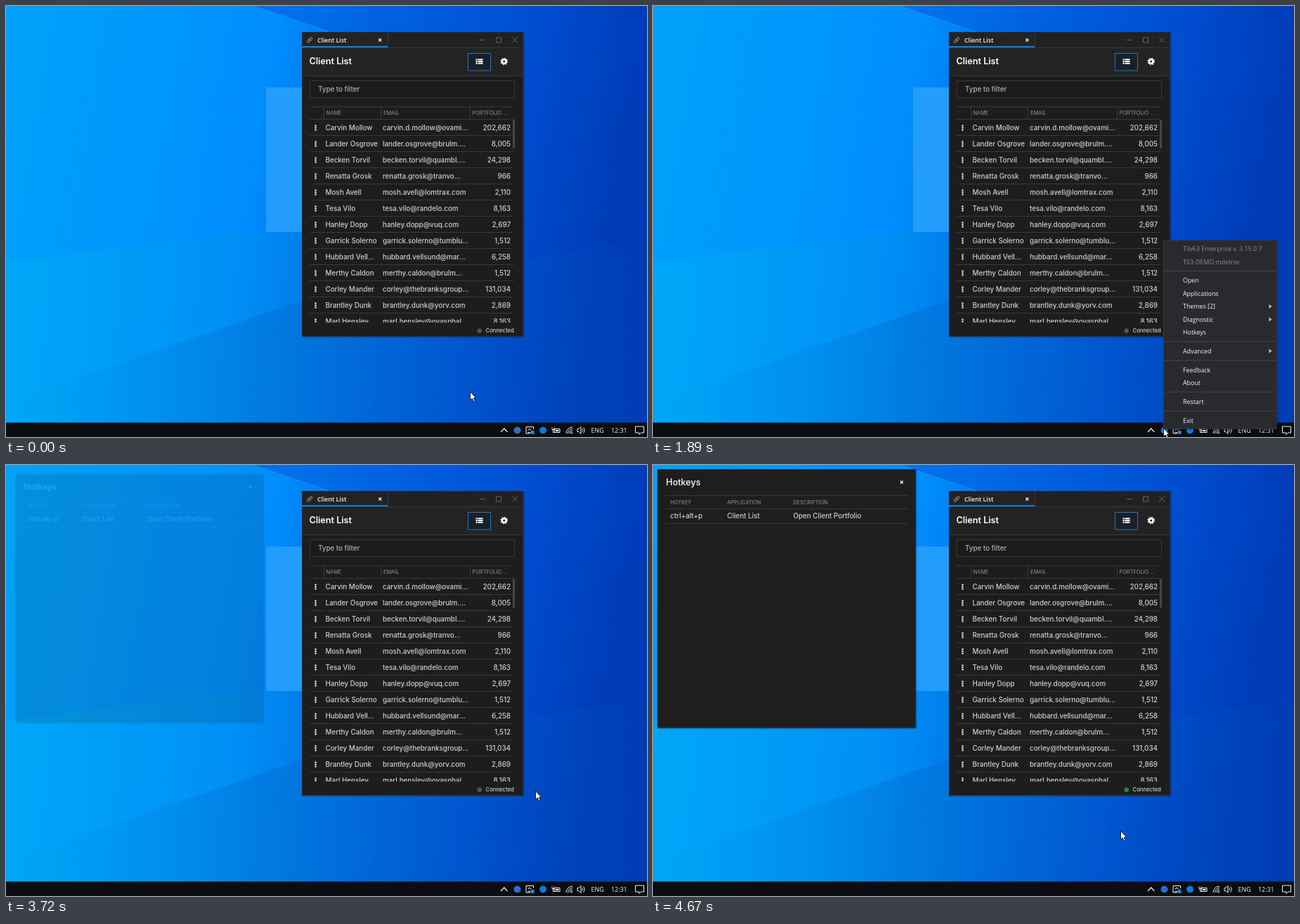
Recreate the animation shown at these times as an HTML page. Size 912 px wide and 614 px high, loop 6.44 s.

```html
<!DOCTYPE html>
<html lang="en">
<head>
<meta charset="utf-8">
<title>Client List hotkeys</title>
<style>
html, body { margin: 0; width: 100%; height: 100%; overflow: hidden; background: #0078e0; }
svg { display: block; width: 912px; height: 614px; }
text { font-family: Inter, "Open Sans", sans-serif; font-size: 9.8px; font-weight: 500; fill: #d0d0d0; white-space: pre; }
.title { font-size: 12.6px; font-weight: 600; fill: #fff; }
.head { font-size: 7.4px; font-weight: 400; fill: #969696; }
.small { font-size: 7.7px; }
.ui { font-family: "Open Sans", "Noto Sans", sans-serif; font-size: 8.9px; font-weight: 400; fill: #f4f4f4; }
.bold { font-size: 8.7px; font-weight: 600; }
.dim { fill: #8d8e90; }
.end { text-anchor: end; }
.line { stroke: #393939; fill: none; }
.icon { stroke: #f2f2f2; fill: none; }
.shadow { filter: drop-shadow(1.5px 1.5px 1px rgba(0, 0, 0, .35)); }

#cursor, #menu, #hover, #hotkeys, #status { animation: 6440ms linear infinite; }
#cursor { animation-name: cursor; animation-timing-function: ease-in-out; }
#menu { animation-name: menu; }
#hover { animation-name: hover; animation-timing-function: step-end; }
#hotkeys { animation-name: fade, grow; transform-origin: 190px 190px; }
#status { animation-name: status; }

@keyframes cursor {
  0%, 1.4% { transform: translate(660px, 549px); }
  4.19%, 6.37% { transform: translate(670px, 554px); }
  16.61% { transform: translate(720px, 590px); }
  18.48% { transform: translate(722px, 596px); }
  23.45%, 29.97% { transform: translate(726px, 601px); }
  35.25% { transform: translate(737px, 530px); }
  45.19%, 57.76% { transform: translate(753px, 464px); animation-timing-function: ease-in; }
  59.63% { transform: translate(750px, 473px); }
  65.84%, 72.36% { transform: translate(666px, 520px); }
  72.52%, 100% { transform: translate(665px, 521px); }
}
@keyframes menu {
  0%, 25.47% { opacity: 0; }
  27.95%, 55.12% { opacity: 1; }
  55.121%, 100% { opacity: 0; }
}
@keyframes hover {
  0% { transform: translateY(-900px); }
  30.9% { transform: translateY(581.5px); }
  32.3% { transform: translateY(554.5px); }
  33.76% { transform: translateY(528px); }
  36.7% { transform: translateY(509.5px); }
  39.2% { transform: translateY(-900px); }
  40.1% { transform: translateY(482.5px); }
  41.8% { transform: translateY(-900px); }
  42.9%, 100% { transform: translateY(455.5px); }
}
@keyframes fade {
  0%, 57.45% { opacity: 0; }
  59.94%, 100% { opacity: 1; }
}
@keyframes grow {
  0%, 57.45% { transform: scale(.955); animation-timing-function: cubic-bezier(.5, 1, .89, 1); }
  61.65%, 100% { transform: scale(1); }
}
@keyframes status {
  0%, 58.2% { fill: #545454; }
  62%, 100% { fill: #3c7a43; }
}
</style>
</head>
<body>
<svg viewBox="0 0 912 614">
  <defs>
    <linearGradient id="sky" x2="1" y2=".12">
      <stop offset="0" stop-color="#00a2f8"/>
      <stop offset=".22" stop-color="#0098fc"/>
      <stop offset=".42" stop-color="#008efd"/>
      <stop offset=".58" stop-color="#006be8"/>
      <stop offset=".8" stop-color="#004fd4"/>
      <stop offset="1" stop-color="#003ab4"/>
    </linearGradient>
    <linearGradient id="low" x2="1">
      <stop offset="0" stop-color="#00b0f6" stop-opacity=".5"/>
      <stop offset=".55" stop-color="#008cec" stop-opacity=".5"/>
      <stop offset="1" stop-color="#0058cc" stop-opacity="0"/>
    </linearGradient>
    <linearGradient id="floor" x2="1">
      <stop offset="0" stop-color="#0098e4" stop-opacity="0"/>
      <stop offset=".4" stop-color="#0074d6" stop-opacity=".6"/>
      <stop offset="1" stop-color="#0048b8" stop-opacity=".2"/>
    </linearGradient>
    <linearGradient id="dusk">
      <stop offset="0" stop-color="#0068e4" stop-opacity=".75"/>
      <stop offset="1" stop-color="#0040c4" stop-opacity=".15"/>
    </linearGradient>
    <clipPath id="table"><path d="M422 143h312v308H422z"/></clipPath>
  </defs>

  <g id="desktop">
    <path d="M0 0h912v614H0z" fill="url(#sky)"/>
    <path d="M352 0H912V130H735z" fill="url(#dusk)"/>
    <path d="M352 0L735 130" stroke="#2ca6ff" stroke-opacity=".45"/>
    <path d="M0 365L370 318 640 330 700 594H0z" fill="url(#low)"/>
    <path d="M0 565L420 420 912 330V594H0z" fill="url(#floor)"/>
    <path d="M370 116h206v206H370z" fill="#229cfd"/>
  </g>

  <g id="taskbar">
    <path d="M0 593.5h912V614H0z" fill="#0c0d11"/>
    <path class="icon" d="M704 607l4.7-5 4.7 5" stroke-width="1.2"/>
    <circle cx="727.5" cy="604.5" r="5" fill="#2c6fc9"/>
    <path class="icon" d="M750.5 603v-3.5h-10.5v9.5h6M743 604.5a2 2 0 1 1 4 0M742.5 607.5h4"/>
    <path d="M747 605h4.5v5H747z" fill="#2f83d8"/>
    <circle cx="764" cy="604.5" r="5" fill="#0a7bdc"/>
    <path class="icon" d="M780.5 602.5h7.5v5h-7.5zM777 600.5v3h3v-3M778.5 603.5v4h2"/>
    <path d="M782 604h4.5v2H782z" fill="#f2f2f2"/>
    <path class="icon" d="M797 609a9 9 0 0 1 9-9M799.5 609a6.5 6.5 0 0 1 6.5-6.5M802 609a4 4 0 0 1 4-4"/>
    <circle cx="805" cy="608.3" r="1.1" fill="#f2f2f2"/>
    <path class="icon" d="M813 602.5h2l3-3v10l-3-3h-2zM820 602.5q1.5 2 0 4M821.5 600.5q3.5 4 0 8"/>
    <text class="ui" x="832.5" y="607.8">ENG</text>
    <text class="ui" x="861" y="607.8">12:31</text>
    <path class="icon" d="M895.5 599h12v9h-4l-2.5 2.5V608h-5.5z"/>
  </g>

  <g id="client">
    <path class="shadow" d="M421 37h315v434H421z" fill="#1d1d1d"/>
    <path d="M421 37h315v62.5H421z" fill="#232324"/>
    <path d="M543.5 38h192v21.5h-192z" fill="#202122"/>
    <path d="M421.5 37.5h314v433h-314z" fill="none" stroke="#2a2b2d"/>
    <path class="line" d="M543.5 38v21.5H735M422 99.5h313"/>
    <path d="M421 57.3h122v2H421z" fill="#1688e6"/>
    <g transform="translate(432 48.5) rotate(-45)" fill="none" stroke="#8a8a8a">
      <rect x="-4.5" y="-1.5" width="5" height="3" rx="1.5"/>
      <rect x="-.5" y="-1.5" width="5" height="3" rx="1.5"/>
    </g>
    <text class="ui bold" x="443" y="52">Client List</text>
    <path class="icon" d="M530.3 46.5l4 4m0-4l-4 4" stroke-width="1.2"/>
    <path d="M674 48.5h8M697.5 45h7v7h-7zM720 44.5l8 8m0-8l-8 8" fill="none" stroke="#656565"/>
    <text class="title" x="431.5" y="83">Client List</text>
    <path d="M657.5 67.5h32v24.500h-32z" fill="#182029" stroke="#2878b8"/>
    <path d="M668.5 75.2h2.2v2h-2.2zm3 0h7v2h-7zm-3 2.8h2.2v2h-2.2zm3 0h7v2h-7zm-3 2.8h2.2v2h-2.2zm3 0h7v2h-7z" fill="#fff"/>
    <circle cx="708.7" cy="79" r="2.8" fill="none" stroke="#fff" stroke-width="2.4"/>
    <circle cx="708.7" cy="79" r="4.5" fill="none" stroke="#fff" stroke-width="1.6" stroke-dasharray="1.767"/>
    <path d="M432.5 106.5h291v24h-291z" fill="#1b1b1b" stroke="#383838"/>
    <text x="444" y="122" style="fill:#b4b4b4">Type to filter</text>
    <path class="line" d="M432 143.5h290M432 161.5h290M452.5 143v18M533.5 143v18M660.5 143v18"/>
    <text class="head" x="455.5" y="155">NAME</text>
    <text class="head" x="537" y="155">EMAIL</text>
    <text class="head" x="663.5" y="155">PORTFOLIO ...</text>
    <g id="rows" clip-path="url(#table)"></g>
    <path d="M721 162h3v41h-3z" fill="#474747"/>
    <circle id="status" cx="673.7" cy="462.8" r="3.3"/>
    <text class="small" x="682.5" y="465.4">Connected</text>
  </g>

  <g id="hotkeys">
    <path class="shadow" d="M6 6h368v368.500H6z" fill="#1e1e1e"/>
    <path d="M6.5 6.5h367v367.500h-367z" fill="none" stroke="#2a2b2d"/>
    <text class="title" x="18.5" y="29.3" style="font-weight:500">Hotkeys</text>
    <path class="icon" d="M351.8 22.5l4 4m0-4l-4 4" stroke-width="1.3"/>
    <path class="line" d="M18 43.5h344M18 62.5h344M18 83.5h344"/>
    <text class="head" x="24.5" y="55.8">HOTKEY</text>
    <text class="head" x="105.5" y="55.8">APPLICATION</text>
    <text class="head" x="199.5" y="55.8">DESCRIPTION</text>
    <text x="24.5" y="76">ctrl+alt+p</text>
    <text x="105.5" y="76">Client List</text>
    <text x="199.5" y="76">Open Client Portfolio</text>
  </g>

  <g id="menu">
    <path class="shadow" d="M726 333.5h161.5v269H726z" fill="#292a2d"/>
    <path d="M726.5 334h160.500v268h-160.500z" fill="none" stroke="#38393c"/>
    <path id="hover" d="M727 0h159.5v18.5H727z" fill="#3e4043"/>
    <path d="M727 377.5h159M727 478h159M727 505h159M727 550h159M727 577h159" stroke="#46474a"/>
    <g id="items"></g>
    <path d="M876.5 425l4 3-4 3zm0 18.5l4 3-4 3zm0 45l4 3-4 3z" fill="#c4c4c4"/>
  </g>

  <path id="cursor" d="M.5.5v12l2.7-2.5 2 4.6 2-.9-2-4.3h3.5z" fill="#fff" stroke="#000" stroke-width=".8"/>
</svg>
<script>
const clients = [
  ['Carvin Mollow', 'carvin.d.mollow@ovami...', '202,662'],
  ['Lander Osgrove', 'lander.osgrove@brulm....', '8,005'],
  ['Becken Torvil', 'becken.torvil@quambl....', '24,298'],
  ['Renatta Grosk', 'renatta.grosk@tranvo...', '966'],
  ['Mosh Avell', 'mosh.avell@lomtrax.com', '2,110'],
  ['Tesa Vilo', 'tesa.vilo@randelo.com', '8,163'],
  ['Hanley Dopp', 'hanley.dopp@vuq.com', '2,697'],
  ['Garrick Solerno', 'garrick.solerno@tumblu...', '1,512'],
  ['Hubbard Vell...', 'hubbard.vellsund@mar...', '6,258'],
  ['Merthy Caldon', 'merthy.caldon@brulm...', '1,512'],
  ['Corley Mander', 'corley@thebranksgroup...', '131,034'],
  ['Brantley Dunk', 'brantley.dunk@yorv.com', '2,869'],
  ['Marl Hensley', 'marl.hensley@ovasphal...', '8,163']
];
const items = [
  [346, 'Tilv63 Enterprise v. 3.15.0.7', 'dim'], [364.5, 'T63-DEMO mdelrov', 'dim'],
  [391, 'Open'], [409.5, 'Applications'], [428, 'Themes [2]'], [446.5, 'Diagnostic'], [465, 'Hotkeys'],
  [491.5, 'Advanced'], [518.5, 'Feedback'], [537, 'About'], [564, 'Restart'], [590.5, 'Exit']
];
const label = (x, y, text, cls = '') => `<text class="${cls}" x="${x}" y="${y}">${text}</text>`;

document.getElementById('rows').innerHTML = clients.map(([name, email, value], i) => {
  const y = 173 + 23 * i;
  return label(454.5, y + 3.6, name) + label(536, y + 3.6, email) + label(718, y + 3.6, value, 'end') +
    `<path d="M440.5 ${y - 3.6}v8" stroke="#fff" stroke-width="2.2" stroke-dasharray="2 1"/>` +
    `<path class="line" d="M432 ${y + 11.5}h290"/>`;
}).join('');

document.getElementById('items').innerHTML =
  items.map(([y, text, cls = '']) => label(754, y + 3.3, text, `ui ${cls}`)).join('');
</script>
</body>
</html>
```
